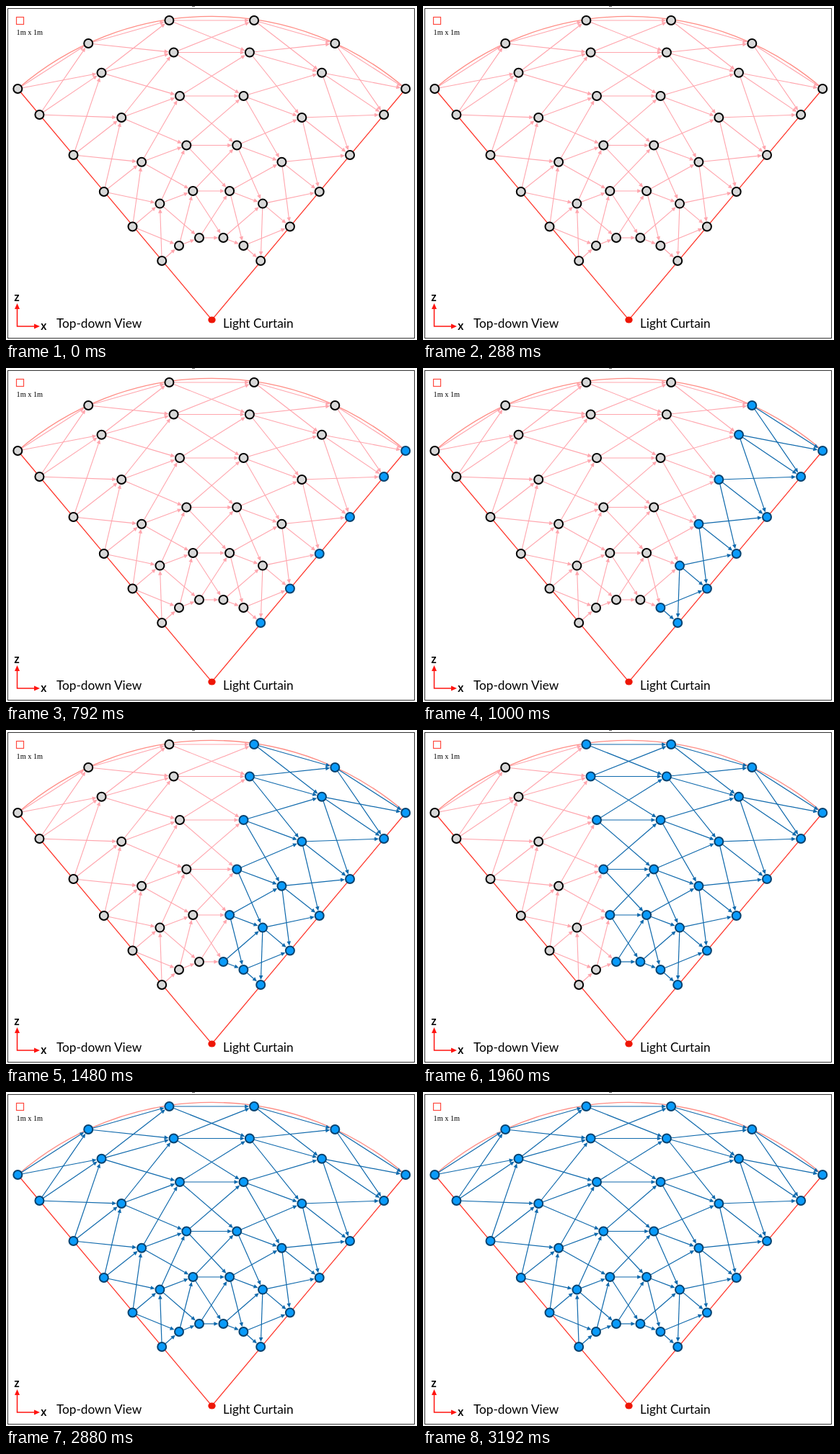
Write an HTML page that moves like this. It is 570 px wide and 464 px high and loops after 3400 ms.

```html
<!DOCTYPE html>
<html lang="en">
<head>
<meta charset="utf-8">
<title>Light curtain graph</title>
<style>
  html, body { margin: 0; width: 100%; height: 100%; overflow: hidden; background: #fff; }
  svg { display: block; width: 570px; height: 464px; }
  .label { font: 17.2px Lato, sans-serif; }
  .axis { font: bold 12px "Open Sans", sans-serif; }
  .scale { font: 10.3px "Liberation Serif", serif; }
  .edges { stroke: #ffa5ad; fill: #ffa5ad; stroke-width: 1.1; }
  .nodes { stroke: #000; fill: #d8d8d8; stroke-width: 2; }
  .edges.on { stroke: #0f69ac; fill: #0f69ac; stroke-width: 1.2; }
  .nodes.on { stroke: #05426f; fill: #0a9bfa; }
</style>
</head>
<body>
<svg viewBox="0 0 570 464">
  <rect x="2.5" y="3.5" width="564" height="458" fill="none" stroke="#333"/>
  <path d="M258 .5h4" stroke="#666"/>
  <rect x="14.5" y="15.5" width="10" height="10" fill="none" stroke="#ff4a40" stroke-width="1.2"/>
  <text class="scale" x="14.5" y="40">1m x 1m</text>
  <g fill="none" stroke-width="1.3">
    <path d="M16.3 115A410 410 0 0 1 554.3 115" stroke="#ff8d85"/>
    <path d="M16.3 115L285.5 436L554.3 115" stroke="#ff3b30"/>
  </g>
  <g id="graph"></g>
  <ellipse cx="285.5" cy="436" rx="5.2" ry="4.5" fill="#ee1606"/>
  <path d="M15.5 420V445H41" fill="none" stroke="#ff1410" stroke-width="1.5"/>
  <path d="M15.5 413l3.5 8h-7zM47 445l-8 3.5v-7z" fill="#ff1410"/>
  <text class="axis" x="11.6" y="410">Z</text>
  <text class="axis" x="48.3" y="449.5">X</text>
  <text class="label" x="70" y="447">Top-down View</text>
  <text class="label" x="301" y="447">Light Curtain</text>
</svg>
<script>
const graph = document.getElementById("graph");
const starts = [0, 480, 1000, 1480, 1960, 2440, 2880];
const loop = 3400;

// Columns run left to right, each listed from the outer arc inwards.
const left = [
  [[16.3, 115], [46.4, 151], [93.5, 207], [135.8, 258], [175.5, 306.5], [216.2, 354]],
  [[114.2, 52], [132.5, 92.7], [160.2, 155], [188.1, 216.7], [213.4, 274.6], [240, 333]],
  [[226.4, 20], [232.6, 64.5], [241, 125], [250.3, 193.5], [259.3, 257], [268, 322]]
];
const mirror = column => column.map(([x, y], row) => [(row < 4 ? 570.5 : 569.4) - x, y]);
const columns = [...left, ...left.map(mirror).reverse()];

function add(parent, tag, attrs) {
  const el = document.createElementNS("http://www.w3.org/2000/svg", tag);
  for (const key in attrs) el.setAttribute(key, attrs[key]);
  return parent.appendChild(el);
}

function addArrow(group, [x1, y1], [x2, y2]) {
  const length = Math.hypot(x2 - x1, y2 - y1) - 7;
  const angle = Math.atan2(y2 - y1, x2 - x1) * 180 / Math.PI;
  const transform = `translate(${x1} ${y1}) rotate(${angle})`;
  add(group, "path", { d: `M0 0H${length - 4}`, transform });
  add(group, "path", { d: `M${length} 0l-6 2.8v-5.6z`, transform, stroke: "none" });
}

const edgeGroups = columns.map((column, c) => {
  const group = add(graph, "g", {});
  column.forEach((from, row) => (columns[c + 1] || []).forEach((to, nextRow) => {
    if (Math.abs(row - nextRow) < 2) addArrow(group, from, to);
  }));
  return group;
});

const nodeGroups = columns.map(column => {
  const group = add(graph, "g", {});
  column.forEach(([cx, cy]) => add(group, "circle", { cx, cy, r: 6 }));
  return group;
});

function draw(now) {
  const time = now % loop;
  const lit = starts.filter(start => start <= time).length - 1;
  columns.forEach((_, c) => {
    const on = c >= columns.length - lit ? " on" : "";
    edgeGroups[c].setAttribute("class", "edges" + on);
    nodeGroups[c].setAttribute("class", "nodes" + on);
  });
}

function tick() {
  draw(performance.now());
  requestAnimationFrame(tick);
}
tick();
</script>
</body>
</html>
```
